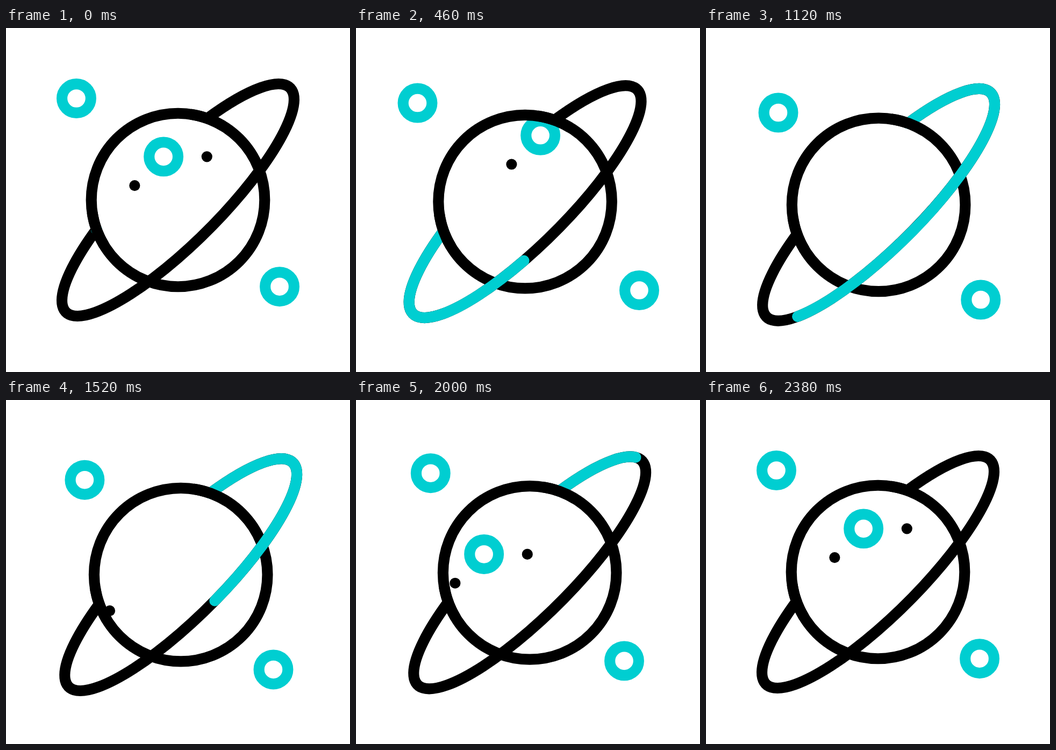
An HTML page with a canvas that plays this animation: 640 by 640 pixels, repeating every 2.4 s.

```html
<!DOCTYPE html>
<html lang="en">
<head>
<meta charset="utf-8">
<title>Ringed planet</title>
<style>
  html, body { margin: 0; height: 100%; overflow: hidden; background: #fff; }
  canvas { display: block; }
</style>
</head>
<body>
<canvas id="stage" width="640" height="640"></canvas>
<script>
const ctx = document.getElementById('stage').getContext('2d');
const LOOP = 2400, UNIT = 26.88, STROKE = 0.75 * UNIT;
const BLACK = '#000', CYAN = '#00ced1', TAU = 2 * Math.PI;
const RING = { a: 295, b: 79, from: 4.196, to: -1.054, length: 983 };
const CLOSED = 2380;

// Drifting loops: each body passes these points at these times.
const times = [0, 460, 800, 1120, 1520, 2000];
const planetPath = [[320, 320], [314.6, 323.1], [316.4, 328.1], [321.1, 328.9], [325.2, 325.1], [323.2, 321.4]];
const moonPaths = [
  [[131, 131], [114.5, 139.5], [121.6, 152.7], [134.5, 157.5], [146.4, 148.7], [138.8, 136.2]],
  [[509, 481.2], [527, 488], [522.5, 500.5], [511.2, 505.5], [497.5, 501.5], [499, 485.4]]
];

const clamp = x => Math.min(1, Math.max(0, x));
const progress = (t, start, end) => clamp((t - start) / (end - start));
const smooth = x => x * x * (3 - 2 * x);

// Smooth closed curve through the points (cubic Hermite, uneven times).
function along(points, t) {
  const n = times.length;
  const timeAt = i => times[(i + n) % n] + Math.floor(i / n) * CLOSED;
  const now = Math.min(t, CLOSED - 0.001);
  let i = n - 1;
  while (times[i] > now) i--;
  const span = timeAt(i + 1) - timeAt(i), u = (now - timeAt(i)) / span;
  return [0, 1].map(axis => {
    const value = k => points[(k + n) % n][axis];
    const slope = k => (value(k + 1) - value(k)) / (timeAt(k + 1) - timeAt(k));
    const tangent = k => {
      const before = timeAt(k) - timeAt(k - 1), after = timeAt(k + 1) - timeAt(k);
      return (after * slope(k - 1) + before * slope(k)) / (before + after);
    };
    const s = smooth(u);
    return value(i) * (1 - s) + value(i + 1) * s +
      span * u * (1 - u) * ((1 - u) * tangent(i) - u * tangent(i + 1));
  });
}

// Craters leave at the upper right and come back from the lower left.
function craterShift(t) {
  if (t < 1100) {
    const s = smooth(t / 1100);
    return [146 * s, -112.5 * s];
  }
  const s = 1 - smooth(progress(t, 1280, 2380));
  return [-212 * s, 168.4 * s];
}

function circle(x, y, r, color, from = 0, to = TAU) {
  ctx.strokeStyle = color;
  ctx.beginPath();
  ctx.arc(x, y, r, from, to);
  ctx.stroke();
}

function dot(x, y) {
  ctx.fillStyle = BLACK;
  ctx.beginPath();
  ctx.arc(x, y, STROKE / 2, 0, TAU);
  ctx.fill();
}

function orbit(color, start, end) {
  if (end <= start) return;
  ctx.strokeStyle = color;
  ctx.lineCap = 'round';
  if (start > 0 || end < 1) {
    ctx.setLineDash([(end - start) * RING.length, 3 * RING.length]);
    ctx.lineDashOffset = -start * RING.length;
  }
  ctx.beginPath();
  ctx.ellipse(0, 0, RING.a, RING.b, -Math.PI / 4, RING.from, RING.to, true);
  ctx.stroke();
  ctx.setLineDash([]);
  ctx.lineCap = 'butt';
}

function draw(t) {
  ctx.fillStyle = '#fff';
  ctx.fillRect(0, 0, 640, 640);
  ctx.lineWidth = STROKE;
  for (const path of moonPaths) circle(...along(path, t), UNIT, CYAN);

  ctx.save();
  ctx.translate(...along(planetPath, t));

  ctx.save();
  ctx.beginPath();
  ctx.arc(0, 0, 6 * UNIT, 0, TAU);
  ctx.clip();
  ctx.translate(...craterShift(t));
  circle(-UNIT, -3 * UNIT, UNIT, CYAN);
  dot(-3 * UNIT, -UNIT);
  dot(2 * UNIT, -3 * UNIT);
  ctx.restore();

  circle(0, 0, 6 * UNIT, BLACK);
  orbit(BLACK, 0, 1);
  orbit(CYAN, progress(t, 773, 2240), progress(t, 0, 1100));
  // The planet's edge hides both ends of the orbit.
  for (const angle of [-1.225, 2.796]) {
    circle(0, 0, 6 * UNIT, BLACK, angle - 0.2, angle + 0.2);
  }
  ctx.restore();
}

function frame() {
  draw(performance.now() % LOOP);
  requestAnimationFrame(frame);
}
frame();
</script>
</body>
</html>
```
